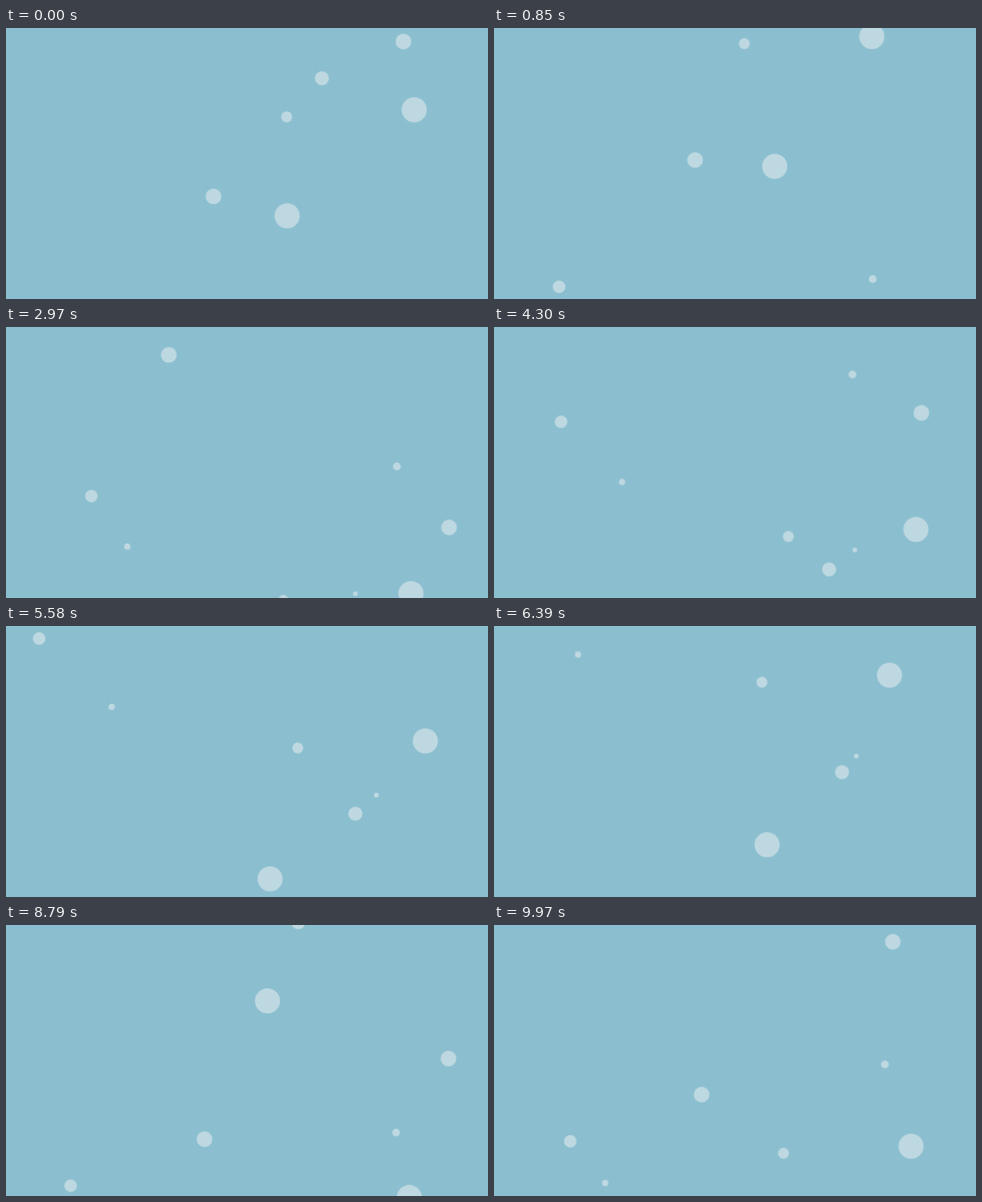
An HTML page without scripts for the animation above (10000 ms loop, 600 by 338 pixels).

```html
<!DOCTYPE html>
<html lang="en">
<head>
<meta charset="utf-8">
<title>Rising bubbles</title>
<style>
  html, body { margin: 0; width: 100%; height: 100%; overflow: hidden; background: #8bbfd0; }
  svg { display: block; width: 600px; height: 338px; overflow: hidden; }

  /* --x: left edge in percent, --d: diameter, --s: start of the rise */
  circle {
    cx: calc(var(--x) * 1% + var(--d) * .5px);
    cy: calc(865px - var(--d) * .5px);
    r: calc(var(--d) * .5px);
    fill: #f1f1f1;
    fill-opacity: .5;
    animation: 10s ease-in var(--s) infinite both;
  }
  .a { --x: 10; --d: 40; animation-name: rise8; }
  .b { --x: 20; --d: 20; animation-name: rise8; }
  .c { --x: 35; --d: 50; animation-name: rise10; }
  .d { --x: 50; --d: 80; animation-name: rise7; }
  .e { --x: 55; --d: 35; animation-name: rise6; }
  .f { --x: 65; --d: 45; animation-name: rise8; }
  .g { --x: 80; --d: 80; animation-name: rise6; }
  .h { --x: 75; --d: 25; animation-name: rise7; }
  .i { --x: 70; --d: 15; animation-name: rise9; }
  .j { --x: 85; --d: 50; animation-name: rise5; }

  /* One rise of 5 to 10 seconds inside the ten second loop */
  @keyframes rise5 {
    0% { translate: 0 100px; transform: translateX(0); }
    25% { transform: translateX(100px); }
    50%, 100% { translate: 0 -1080px; transform: translateX(-200px); }
  }
  @keyframes rise6 {
    0% { translate: 0 100px; transform: translateX(0); }
    30% { transform: translateX(100px); }
    60%, 100% { translate: 0 -1080px; transform: translateX(-200px); }
  }
  @keyframes rise7 {
    0% { translate: 0 100px; transform: translateX(0); }
    35% { transform: translateX(100px); }
    70%, 100% { translate: 0 -1080px; transform: translateX(-200px); }
  }
  @keyframes rise8 {
    0% { translate: 0 100px; transform: translateX(0); }
    40% { transform: translateX(100px); }
    80%, 100% { translate: 0 -1080px; transform: translateX(-200px); }
  }
  @keyframes rise9 {
    0% { translate: 0 100px; transform: translateX(0); }
    45% { transform: translateX(100px); }
    90%, 100% { translate: 0 -1080px; transform: translateX(-200px); }
  }
  @keyframes rise10 {
    0% { translate: 0 100px; transform: translateX(0); }
    50% { transform: translateX(100px); }
    100% { translate: 0 -1080px; transform: translateX(-200px); }
  }

  /* Rises cut by the loop point show on one side of it only */
  g { animation: 10s step-end infinite; }
  .until4 { animation-name: until4; }
  .until8 { animation-name: until8; }
  .from4 { animation-name: from4; }
  .from6 { animation-name: from6; }
  @keyframes until4 { 0% { visibility: visible; } 40%, 100% { visibility: hidden; } }
  @keyframes until8 { 0% { visibility: visible; } 80%, 100% { visibility: hidden; } }
  @keyframes from4 { 0% { visibility: hidden; } 40%, 100% { visibility: visible; } }
  @keyframes from6 { 0% { visibility: hidden; } 60%, 100% { visibility: visible; } }
</style>
</head>
<body>
<svg viewBox="0 0 1536 865" preserveAspectRatio="none">
  <circle class="c" style="--s:-5.235s"/>
  <circle class="e" style="--s:1.765s"/>
  <circle class="f" style="--s:1.765s"/>
  <circle class="g" style="--s:1.765s"/>
  <circle class="i" style="--s:.765s"/>
  <circle class="j" style="--s:.765s"/>
  <g class="until4">
    <circle class="d" style="--s:-3.235s"/>
    <circle class="e" style="--s:-4.235s"/>
    <circle class="f" style="--s:-6.235s"/>
    <circle class="g" style="--s:-4.235s"/>
    <circle class="j" style="--s:-4.235s"/>
  </g>
  <g class="until8">
    <circle class="a" style="--s:-1.235s"/>
    <circle class="b" style="--s:-.235s"/>
    <circle class="h" style="--s:-1.235s"/>
  </g>
  <g class="from4">
    <circle class="d" style="--s:3.765s"/>
    <circle class="e" style="--s:7.765s"/>
    <circle class="g" style="--s:7.765s"/>
    <circle class="h" style="--s:5.765s"/>
    <circle class="j" style="--s:5.765s"/>
  </g>
  <g class="from6">
    <circle class="a" style="--s:6.765s"/>
    <circle class="b" style="--s:7.765s"/>
  </g>
</svg>
</body>
</html>
```
